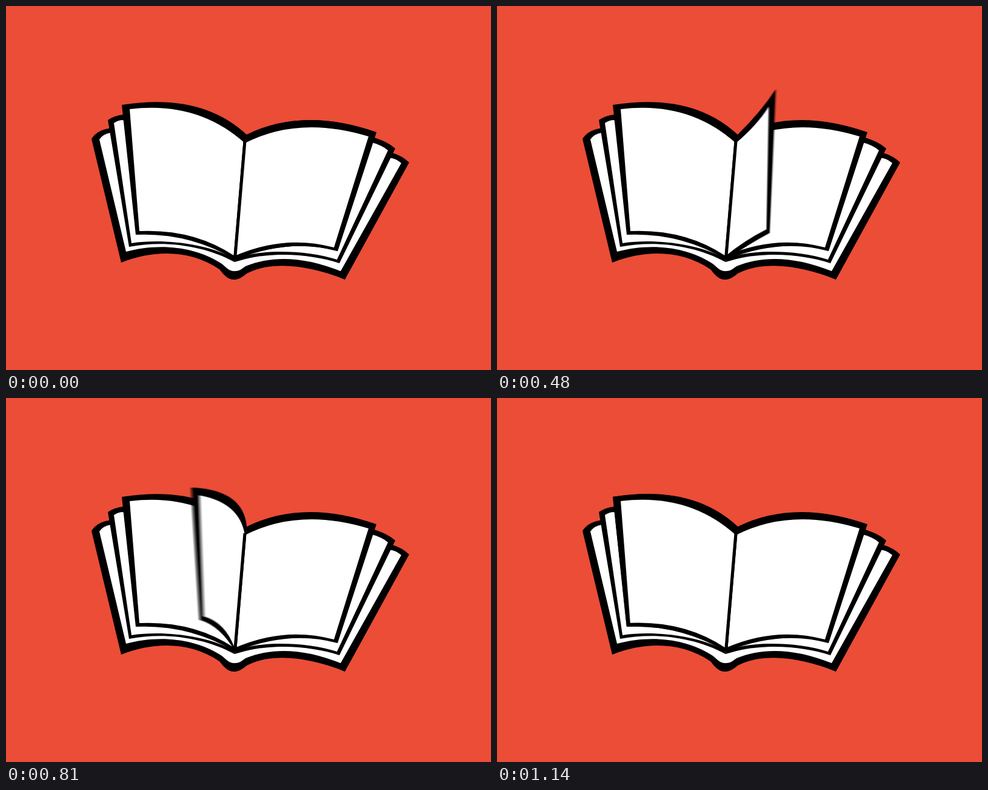
These frames come from a looping animation (800x600 px, 1170 ms). An HTML page with a canvas:

```html
<!DOCTYPE html>
<html lang="en">
<head>
<meta charset="utf-8">
<title>Book</title>
<style>
  html, body { margin: 0; width: 100%; height: 100%; overflow: hidden; background: #eb4d37; }
  canvas { display: block; width: 800px; height: 600px; }
</style>
</head>
<body>
<canvas id="stage" width="800" height="600"></canvas>
<script>
const LOOP = 1170, STEP = 30, SAMPLES = 12;
const BG = '#eb4d37', INK = '#000', PAPER = '#fff';

const stage = document.getElementById('stage').getContext('2d');
const layer = () => {
  const c = document.createElement('canvas');
  c.width = 800;
  c.height = 600;
  return c.getContext('2d');
};
const book = layer(), scratch = layer();

// Back to front: cover, then the middle leaves on both sides.
const leaves = [
  [INK, 'M141 219Q150 204 174 201L397 300 637 242Q654 247 665 258L559 451C500 427 440 420 399 440C392 444 387 451 376 451C366 451 360 444 352 434C305 402 245 401 190 423Z'],
  [PAPER, 'M154 220Q160 211 172 209L397 320 632 250Q643 251 652 259L552 437C495 414 440 410 395 429C388 434 385 437 377 437C367 437 364 431 356 425C310 395 250 391 198 405Z'],
  [INK, 'M168 188Q178 181 193 179L378 415 377 422C325 394 260 386 203 397Z'],
  [PAPER, 'M178 193Q185 188 193 188L370 413C328 392 260 383 207 391Z'],
  [INK, 'M600 215Q628 222 642 235L550 424C510 411 450 404 395 417L377 422 378 414Z'],
  [PAPER, 'M600 224Q620 229 630 238L546 418C500 404 440 401 396 411L380 413Z']
];

// The turn in half circles: 0 lies on the right, 1 on the left.
const turnKeys = [[0, 0], [210, 0.14], [480, 0.41], [690, 0.53], [810, 0.65], [990, 0.79], [1140, 1]];

function turnAt(time) {
  const t = Math.max(0, Math.min(1140, time));
  const i = turnKeys.findIndex(key => key[0] >= t) || 1;
  const [t0, a] = turnKeys[i - 1], [t1, b] = turnKeys[i];
  return a + (b - a) * (t - t0) / (t1 - t0);
}

// The corners swing from right to left; lift and bend are strongest halfway.
function pageAt(turn) {
  const c = Math.cos(Math.PI * turn), s = Math.sin(Math.PI * turn), s3 = s ** 3;
  const inward = -Math.tanh(5 * c);
  const swing = (right, left, dx, dy) => ({
    x: left[0] + (right[0] - left[0]) * (1 + c) / 2 + dx,
    y: left[1] + (right[1] - left[1]) * (1 + c) / 2 + dy
  });
  const inset = (p, dx, dy) => ({ x: p.x + dx, y: p.y + dy });

  const top = swing([611, 208], [191, 163], 0, -s * (47 + 35 * c));
  const topBend = swing([490, 166], [322, 142], s * (14 - 28 * c), s * (12 + 20 * c));
  const foot = swing([547, 404], [214, 377], -28 * s * Math.cos(2 * Math.PI * turn), -21 * s);
  const footBend = swing([467, 382], [302, 373], 8 * s, s3 * (10 + 20 * c));
  return {
    outer: { head: { x: 397, y: 212 }, base: { x: 378, y: 418 }, top, topBend, foot, footBend },
    inner: {
      head: { x: 394, y: 226 },
      base: { x: 377, y: 412 },
      top: inset(top, 13 * inward, 7 + s3 * (18 + 22 * c)),
      topBend: inset(topBend, -6, 14 + 8 * s),
      foot: inset(foot, 6 * inward, -6),
      footBend: inset(footBend, 8 * inward, -6)
    }
  };
}

function sheet(g, color, p) {
  g.fillStyle = color;
  g.beginPath();
  g.moveTo(p.head.x, p.head.y);
  g.quadraticCurveTo(p.topBend.x, p.topBend.y, p.top.x, p.top.y);
  g.lineTo(p.foot.x, p.foot.y);
  g.quadraticCurveTo(p.footBend.x, p.footBend.y, p.base.x, p.base.y);
  g.closePath();
  g.fill();
}

function page(g, turn) {
  const { outer, inner } = pageAt(turn);
  sheet(g, INK, outer);
  sheet(g, PAPER, inner);
}

function spine(g) {
  g.strokeStyle = INK;
  g.lineWidth = 5;
  g.beginPath();
  g.moveTo(394, 223);
  g.lineTo(377.5, 418);
  g.stroke();
}

function drawBook() {
  book.fillStyle = BG;
  book.fillRect(0, 0, 800, 600);
  for (const [color, path] of leaves) {
    book.fillStyle = color;
    book.fill(new Path2D(path));
  }
  page(book, 1);
  page(book, 0);
  spine(book);
}

// Motion blur: average several moments; the shutter opens longer as the turn goes on.
function draw(time) {
  const shutter = 22 * time / LOOP;
  for (let i = 0; i < SAMPLES; i++) {
    scratch.drawImage(book.canvas, 0, 0);
    page(scratch, turnAt(time + shutter * ((i + 0.5) / SAMPLES - 0.5)));
    spine(scratch);
    stage.globalAlpha = 1 / (i + 1);
    stage.drawImage(scratch.canvas, 0, 0);
  }
}

const start = performance.now();

function tick() {
  const t = (performance.now() - start) % LOOP;
  draw(Math.floor(t / STEP) * STEP);
  requestAnimationFrame(tick);
}

drawBook();
tick();
</script>
</body>
</html>
```
